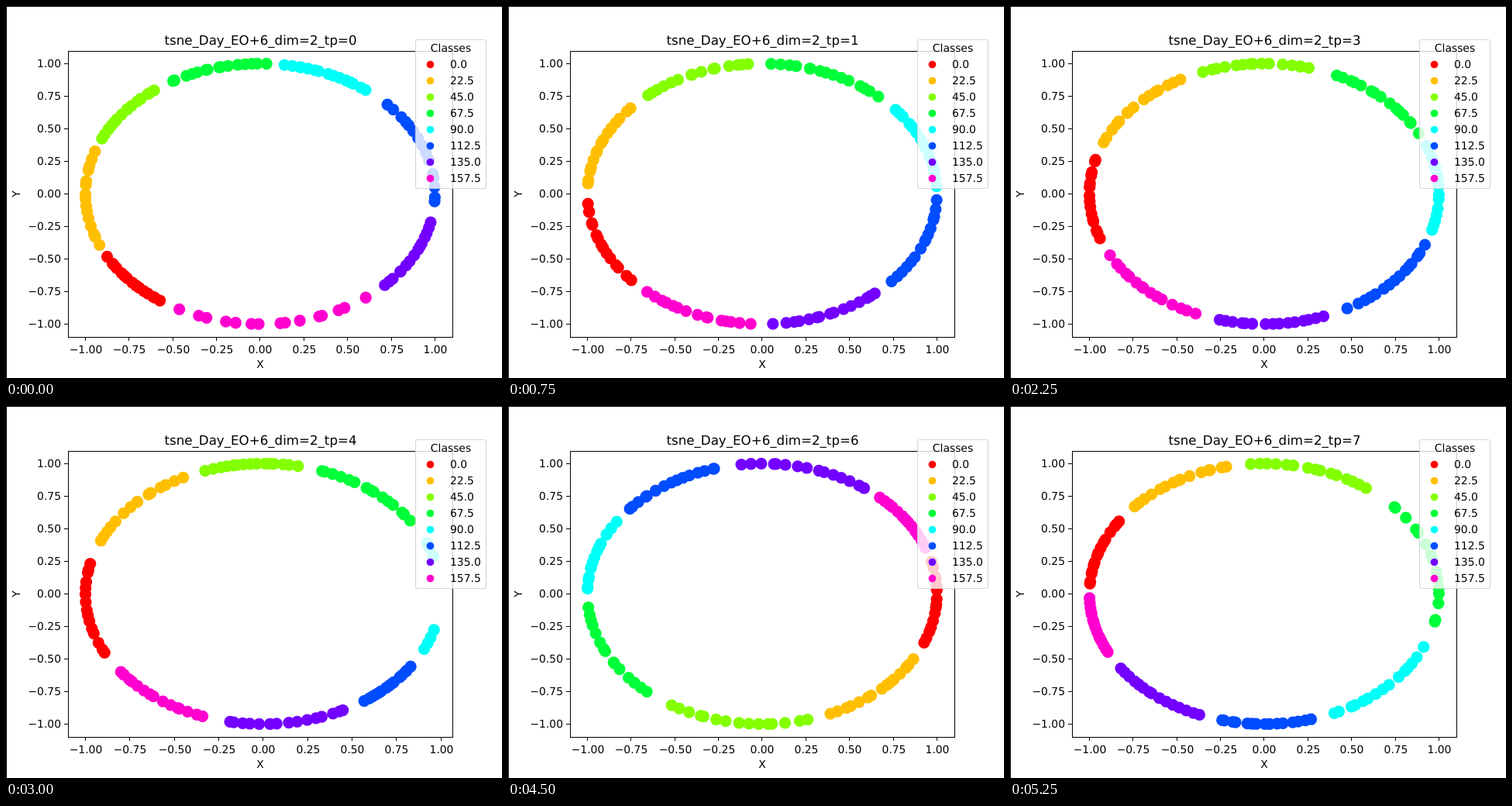
These frames come from a looping animation (640x480 px, 6 s). An HTML page with a canvas:

```html
<!DOCTYPE html>
<html>
<head>
<meta charset="utf-8">
<style>
  html, body { margin: 0; width: 100%; height: 100%; overflow: hidden; background: #fff; }
  canvas { display: block; }
</style>
</head>
<body>
<canvas id="stage" width="640" height="480"></canvas>
<script>
const ctx = document.getElementById('stage').getContext('2d');
const HOLD = 750;
const COLORS = ['#ff0000', '#ffbf00', '#84ff00', '#00ff39', '#00fff7', '#004cff', '#7300ff', '#ff00cf'];
const PER_CLASS = 15;
const FILL = 0.88;
const LEFT = 80, RIGHT = 576, TOP = 58, BOTTOM = 427;
const DATA_LEFT = 102.5, DATA_WIDTH = 450.9, CENTER_Y = 242.4, RADIUS_Y = 168;

let seed = 7;
function random() {
  seed = (seed * 16807) % 2147483647;
  return seed / 2147483647;
}

const evenSlices = start => COLORS.map((_, k) => start - 45 * k);

// The classes share the circle clockwise; edges hold the angle where each slice begins.
function makePlot(edges, maxX = 1) {
  const points = [];
  for (const k of [0, 2, 4, 6, 1, 3, 5, 7]) {
    const end = k < 7 ? edges[k + 1] : edges[0] - 360;
    const middle = (edges[k] + end) / 2;
    const width = (edges[k] - end) * FILL;
    for (let i = 0; i < PER_CLASS; i++) {
      const angle = (middle + width * ((i + random()) / PER_CLASS - 0.5)) * Math.PI / 180;
      const x = Math.cos(angle);
      if (x <= maxX) points.push({ x, y: Math.sin(angle), color: COLORS[k] });
    }
  }
  const rx = DATA_WIDTH / (1 + maxX);
  return { points, rx, cx: DATA_LEFT + rx };
}

const plots = [
  makePlot([238, 207, 157, 124, 85, 50, -9, -48]),
  makePlot(evenSlices(225)),
  makePlot([124, 68, 24, -6, -50, -95, -132, -170]),
  makePlot(evenSlices(205)),
  makePlot([212, 161, 112, 76, 30, -32, -58, -106], 0.966),
  makePlot([174, 126, 84, 44, -2, -77, -104, -152]),
  makePlot([17, -26, -70, -127, -178, -216, -259, -310]),
  makePlot([180, 142, 98, 50, -20, -72, -108, -150]),
];

function label(text, x, y, align = 'center', size = 13.89) {
  ctx.font = size + 'px "DejaVu Sans", sans-serif';
  ctx.textRendering = 'geometricPrecision';
  ctx.textAlign = align;
  ctx.fillStyle = '#000';
  ctx.fillText(text, x, y);
}

function dot(x, y, radius, color) {
  ctx.fillStyle = color;
  ctx.beginPath();
  ctx.arc(x, y, radius, 0, 2 * Math.PI);
  ctx.fill();
}

function drawAxes({ cx, rx }) {
  ctx.strokeStyle = '#000';
  ctx.lineWidth = 1;
  ctx.strokeRect(LEFT + 0.5, TOP + 0.5, RIGHT - LEFT, BOTTOM - TOP);
  for (let i = -4; i <= 4; i++) {
    const x = Math.round(cx + rx * i / 4 - 0.5);
    const y = Math.round(CENTER_Y - RADIUS_Y * i / 4 - 0.5);
    const text = (i < 0 ? '\u2212' : '') + Math.abs(i / 4).toFixed(2);
    ctx.fillStyle = '#000';
    ctx.fillRect(x, BOTTOM, 1, 5);
    ctx.fillRect(LEFT - 5, y, 5, 1);
    label(text, x + 1, 448);
    label(text, 71, y + 5, 'right');
  }
  label('X', 328, 467);
  ctx.save();
  ctx.translate(18, 242.5);
  ctx.rotate(-Math.PI / 2);
  label('Y', 0, 0);
  ctx.restore();
}

function drawLegend() {
  ctx.beginPath();
  ctx.roundRect(528.5, 43.5, 91, 192, 3);
  ctx.fillStyle = 'rgba(255,255,255,0.8)';
  ctx.fill();
  ctx.strokeStyle = 'rgba(204,204,204,0.8)';
  ctx.lineWidth = 1.2;
  ctx.stroke();
  label('Classes', 574, 59);
  COLORS.forEach((color, k) => {
    const y = 75 + k * 21;
    dot(547.5, y + 0.5, 4.86, color);
    label((k * 22.5).toFixed(1), 573, y + 5, 'left');
  });
}

function draw(now) {
  const step = Math.floor(now / HOLD) % plots.length;
  const plot = plots[step];
  ctx.fillStyle = '#fff';
  ctx.fillRect(0, 0, 640, 480);
  for (const { x, y, color } of plot.points) {
    dot(plot.cx + plot.rx * x, CENTER_Y - RADIUS_Y * y, 7.64, color);
  }
  drawAxes(plot);
  label('tsne_Day_EO+6_dim=2_tp=' + step, 328.5, 50, 'center', 16.67);
  drawLegend();
  ctx.fillStyle = '#000';
  ctx.fillRect(0, 0, 640, 1);
  ctx.fillRect(0, 0, 1, 480);
  requestAnimationFrame(draw);
}
requestAnimationFrame(draw);
</script>
</body>
</html>
```
